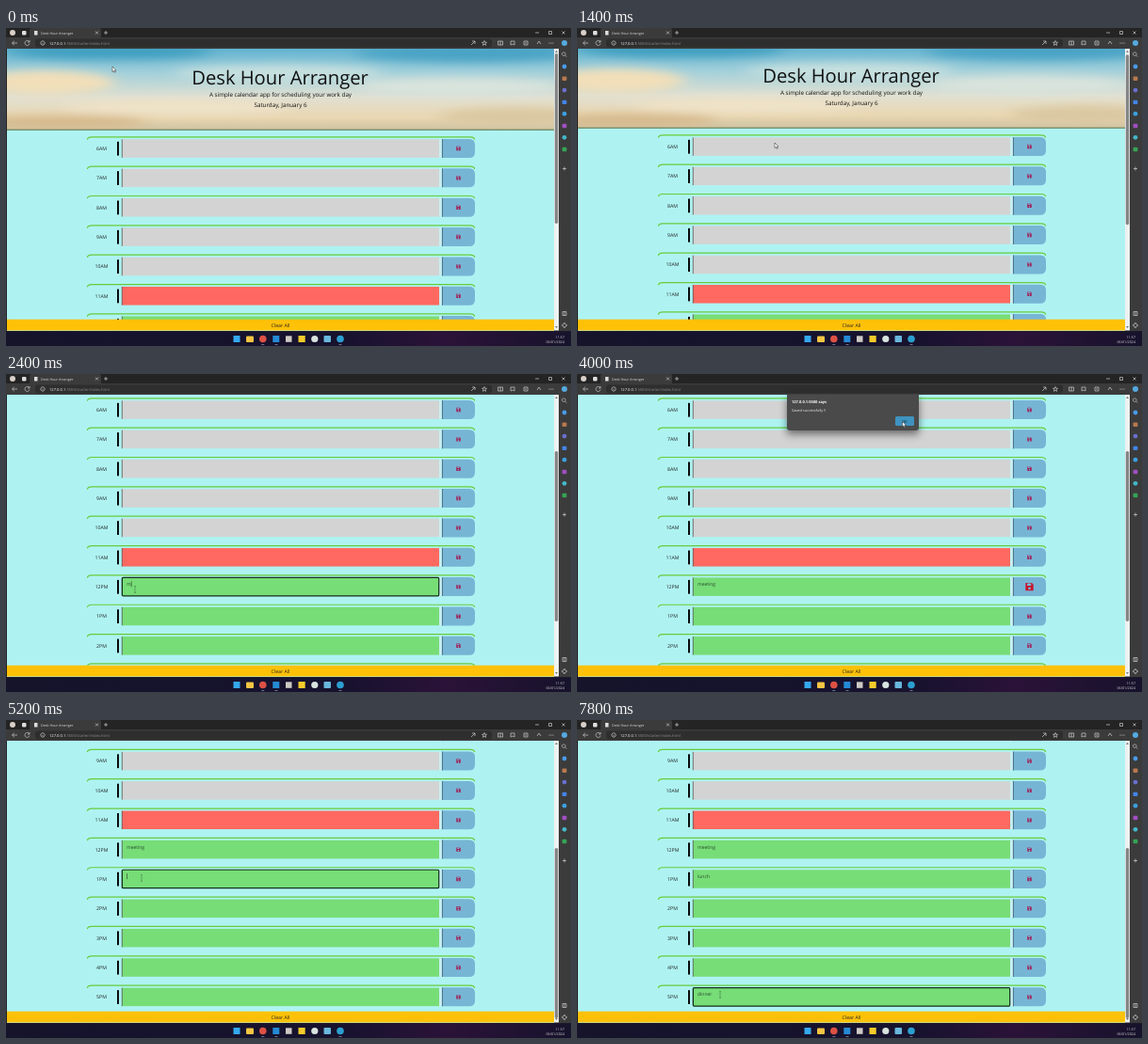
These frames come from a looping animation (600 by 338 pixels, 8000 ms). An HTML page:

```html
<!DOCTYPE html>
<html lang="en">
<head>
<meta charset="utf-8">
<title>Desk Hour Arranger</title>
<style>
  html, body { margin: 0; width: 100%; height: 100%; overflow: hidden; background: #222; }
  svg { display: block; width: 100%; height: 100%; }
  text { font-family: "Open Sans", "Noto Sans", sans-serif; text-rendering: geometricPrecision; white-space: pre; }
  .mid { text-anchor: middle; }
  .line { fill: none; stroke: #ccc; stroke-width: .7; }
</style>
</head>
<body>
<svg viewBox="0 0 600 338" id="stage">
  <defs>
    <linearGradient id="sky" x2="0" y2="1">
      <stop offset="0" stop-color="#62b3d0"/>
      <stop offset=".3" stop-color="#a3d0da"/>
      <stop offset=".6" stop-color="#e0e0d2"/>
      <stop offset=".85" stop-color="#ead7b2"/>
      <stop offset="1" stop-color="#cfc3a2"/>
    </linearGradient>
    <linearGradient id="bar">
      <stop offset="0" stop-color="#15142b"/>
      <stop offset=".6" stop-color="#17122e"/>
      <stop offset=".78" stop-color="#2b1238"/>
      <stop offset="1" stop-color="#17132c"/>
    </linearGradient>
    <filter id="soft" x="-50%" y="-100%" width="200%" height="300%"><feGaussianBlur stdDeviation="9 5"/></filter>
    <filter id="shade" x="-20%" y="-30%" width="140%" height="190%"><feGaussianBlur stdDeviation="4"/></filter>
    <clipPath id="view"><rect x="1" y="22" width="581" height="288"/></clipPath>
    <clipPath id="skyClip"><rect x="1" y="22" width="581" height="86"/></clipPath>
    <path id="disk" d="M-2.2-2.2H1.3L2.2-1.3V2.2H-2.2ZM-1.3-1.9V-.6H.9V-1.9ZM0 .2A.75.75 0 1 0 .01 .2Z" fill-rule="evenodd"/>
  </defs>

  <rect width="600" height="338" fill="#242424"/>
  <g id="chrome"></g>

  <rect x="1" y="22" width="581" height="300" fill="#aef3f2"/>
  <g clip-path="url(#view)">
    <g id="page">
      <g clip-path="url(#skyClip)">
        <rect x="1" y="22" width="581" height="86" fill="url(#sky)"/>
        <g filter="url(#soft)">
          <ellipse cx="110" cy="25" rx="110" ry="8" fill="#3f9fc0"/>
          <ellipse cx="490" cy="27" rx="120" ry="9" fill="#48a3c5"/>
          <ellipse cx="40" cy="58" rx="75" ry="13" fill="#f2dfb9"/>
          <ellipse cx="290" cy="48" rx="110" ry="9" fill="#c7e0df"/>
          <ellipse cx="480" cy="62" rx="110" ry="9" fill="#d9e4dd"/>
          <ellipse cx="180" cy="84" rx="120" ry="7" fill="#f0e3c8"/>
          <ellipse cx="540" cy="94" rx="80" ry="9" fill="#d9c7a0"/>
          <ellipse cx="60" cy="100" rx="90" ry="7" fill="#d6b98d"/>
        </g>
      </g>
      <rect x="1" y="107.7" width="581" height="1" fill="#587044"/>
      <g class="mid" fill="#111">
        <text x="291" y="60" font-size="20.2">Desk Hour Arranger</text>
        <text x="291.5" y="72.8" font-size="6.27">A simple calendar app for scheduling your work day</text>
        <text x="291.5" y="84" font-size="6.27">Saturday, January 6</text>
      </g>
      <g id="rows"></g>
    </g>
  </g>
  <rect x="1" y="309.7" width="581" height="11.8" fill="#ffc107"/>
  <text class="mid" x="291.5" y="317.6" font-size="5.2" fill="#222">Clear All</text>

  <rect x="582" y="22" width="5" height="299.5" fill="#eef1f1"/>
  <path d="M583 26L584.5 24L586 26ZM583 317L584.5 319L586 317Z" fill="#777"/>
  <rect id="thumb" x="582.8" width="3.4" height="181" rx="1.7" fill="#858585"/>

  <g id="dialog">
    <rect x="223" y="26" width="140" height="38" fill="#000" opacity=".5" filter="url(#shade)"/>
    <path d="M223 21.5H363V57Q363 60 360 60H226Q223 60 223 57Z" fill="#4a4a4a"/>
    <text x="228" y="31" font-size="4" font-weight="700" fill="#fff">127.0.0.1:5500 says</text>
    <text x="228" y="39.6" font-size="3.9" fill="#eee">Saved successfully !!</text>
    <rect x="338" y="45" width="20" height="10" rx="1.5" fill="#3f93bf"/>
    <text class="mid" x="348" y="51.6" font-size="4" fill="#123">OK</text>
  </g>

  <path id="arrow" d="M0 0V5.6L1.4 4.4L2.3 6.4L3.2 6L2.3 4.1H4Z" fill="#fff" stroke="#222" stroke-width=".5"/>
  <path id="beam" d="M-1-3.4H1M0-3.4V3.4M-1 3.4H1" fill="none" stroke="#3c6b42" stroke-width=".5"/>
</svg>

<script>
const LOOP = 8000, STEP = 200, PITCH = 31.35;
const $ = id => document.getElementById(id);

function add(parent, tag, attrs, content = '') {
  const el = document.createElementNS('http://www.w3.org/2000/svg', tag);
  for (const key in attrs) el.setAttribute(key, attrs[key]);
  el.textContent = content;
  parent.append(el);
  return el;
}

// Browser window and taskbar
const chrome = $('chrome');
const box = (x, y, width, height, fill, rx = 0) => add(chrome, 'rect', { x, y, width, height, fill, rx });
const dot = (cx, cy, r, fill) => add(chrome, 'circle', { cx, cy, r, fill });
const line = d => add(chrome, 'path', { d, class: 'line' });
const label = (x, y, size, fill, content, anchor = 'start') =>
  add(chrome, 'text', { x, y, 'font-size': size, fill, 'text-anchor': anchor }, content);

box(25, 0, 76, 12, '#3b3b3b', 2);
box(0, 10, 600, 12, '#3b3b3b');
box(587, 10, 13, 312, '#3b3b3b');
box(31, 11.5, 485, 9, '#2e2e2e', 3);
dot(7, 5, 3, '#d8cfc9');
box(17, 3, 4.5, 4.5, '#ddd', 1);
box(30, 3, 3.5, 4.5, '#ddd');
label(37, 6.6, 3.7, '#ddd', 'Desk Hour Arranger');
line('M95 3.5L98 6.5M98 3.5L95 6.5M104 5H108M106 3V7');
line('M562 5H566M576.5 3.5H579.5V6.5H576.5ZM590.5 3.5L593.5 6.5M593.5 3.5L590.5 6.5');
line('M12 16H6.5L8.8 13.8M6.5 16L8.8 18.2M24.6 14.5A2.5 2.5 0 1 0 25 16.5M25 13V15H23');
line('M39 13.8A2.2 2.2 0 1 0 39.01 13.8M39 15.8V17.2');
label(46, 17.6, 4.1, '#fff', '127.0.0.1').insertAdjacentHTML('beforeend',
  '<tspan fill="#8b8b8b">:5500/starter/index.html</tspan>');
line('M494 18L498 14M495 14H498V17M508 13.5L508.7 15.3H510.5L509 16.5L509.6 18.4L508 17.3L506.4 18.4L507 16.5L505.5 15.3H507.3Z');
line('M522.5 14H527.5V18H522.5ZM525 14V18M536 14H540V18L538 17L536 18ZM550 14H554V18H550ZM552 15V17M564 17L566 14L568 17');
[577, 579, 581].forEach(x => dot(x, 16, .55, '#ccc'));

dot(593, 16, 3, '#55a9df');
line('M592.3 25.8A1.8 1.8 0 1 0 592.31 25.8M593.7 29L595.2 30.6');
['#4a9bea', '#b8794f', '#6a6fd0', '#4385e8', '#3aa0e0', '#a04fc0', '#42b8c8', '#35a455']
  .forEach((fill, i) => i % 2 ? box(590.6, 39 + 12.55 * i, 4.8, 4.4, fill, 1) : dot(593, 41 + 12.55 * i, 2.4, fill));
line('M591 149.5H595M593 147.5V151.5M591 301.5H595V305.5H591ZM593 301.5V305.5');
line('M593 314A2 2 0 1 0 593.01 314M593 313V314M593 318V319M590 316H591M595 316H596');

box(0, 322.3, 600, 15.7, 'url(#bar)');
box(241.5, 327, 7, 7, '#35a8ee');
box(255, 327.5, 8, 6.5, '#f5c543', 1);
dot(272.8, 330.5, 3.8, '#dd5144');
box(283.3, 327, 7, 7, '#2589d5');
box(297, 327.3, 6.5, 6.5, '#cfcac4');
box(310.5, 327, 7.2, 7, '#f4cb2a');
dot(327.8, 330.5, 3.6, '#d9e3df');
box(337.5, 327, 7.5, 7, '#69b7dc', 1);
dot(355, 330.5, 3.8, '#2b9fd0');
[272.8, 287, 355].forEach(x => box(x - 1.5, 336, 3, .7, '#8fa0b0'));
label(593, 329.7, 3.7, '#ddd', '11:57', 'end');
label(593, 335.2, 3.7, '#ddd', '06/01/2024', 'end');

// Planner rows
const rows = Array.from({ length: 12 }, (_, i) => {
  const hour = i + 6;
  const g = add($('rows'), 'g', { transform: `translate(0 ${128 + i * PITCH})` });
  const name = (hour > 12 ? hour - 12 : hour) + (hour < 12 ? 'AM' : 'PM');
  const fill = hour < 11 ? '#d3d3d3' : hour === 11 ? '#ff6961' : '#77dd77';
  add(g, 'path', { d: 'M86.3-9.5Q87-12.2 91-12.2H493Q497-12.2 497.7-9.5', fill: 'none', stroke: '#68cb3c', 'stroke-width': 1.2 });
  add(g, 'text', { class: 'mid', x: 101.5, y: 1.9, 'font-size': 5.2, fill: '#222' }, name);
  add(g, 'rect', { x: 118, y: -7.2, width: 1.9, height: 14.8, fill: '#000' });
  add(g, 'rect', { x: 123, y: -9.7, width: 337, height: 19.5, fill });
  add(g, 'rect', { x: 122.8, y: -9.7, width: .8, height: 19.5, fill: '#555' });
  add(g, 'rect', { x: 460, y: -9.7, width: 3, height: 19.5, fill: '#c9f0f3' });
  add(g, 'path', { d: 'M463-10H492Q498-10 498-4V4Q498 10 492 10H463Z', fill: '#77b5d5' });
  add(g, 'rect', { x: 462.9, y: -10, width: .8, height: 20, fill: '#3c5f70' });
  return {
    ring: add(g, 'rect', { x: 123.4, y: -9.7, width: 336.3, height: 19.4, rx: 1, fill: 'none', stroke: '#14301a', 'stroke-width': 1.2 }),
    text: add(g, 'text', { x: 128, y: -.9, 'font-size': 5, fill: '#24482a' }),
    caret: add(g, 'rect', { y: -5.8, width: .5, height: 6, fill: '#111' }),
    icon: add(g, 'use', { href: '#disk' })
  };
});

// Timeline: each key is [time, ...values], joined by straight lines
const scrollKeys = [[0, 0], [400, 0], [800, 86], [1000, 130], [1400, 2], [1600, 0], [1800, 30], [2000, 90], [4400, 90], [4800, 178.5]];
const pointerKeys = [[0, 113, 41], [400, 190, 85], [800, 211, 101], [1400, 210, 122], [1800, 190, 170], [2200, 137, 229],
  [3000, 137, 229], [3400, 479, 225], [3600, 479, 225], [4000, 345.5, 50.5], [4200, 345.5, 50.5], [5000, 144, 168], [5800, 144, 168],
  [6200, 479, 167], [6400, 479, 167], [6600, 345.5, 50.5], [6800, 345.5, 50.5], [7200, 152, 292]];
const entries = [
  { row: 6, word: 'meeting', focus: 2200, type: 2400, save: 3400, close: 4200 },
  { row: 7, word: 'lunch', focus: 5200, type: 5400, save: 6200, close: 6800 },
  { row: 11, word: 'dinner', focus: 7200, type: 7300, save: LOOP, close: LOOP }
];

function sample(keys, t) {
  const i = keys.findIndex(k => k[0] > t);
  if (i < 0) return keys.at(-1).slice(1);
  const a = keys[i - 1], b = keys[i], p = (t - a[0]) / (b[0] - a[0]);
  return a.slice(1).map((v, n) => v + (b[n + 1] - v) * p);
}
const show = (el, on) => el.setAttribute('visibility', on ? 'visible' : 'hidden');
const move = (el, x, y, scale = 1) => el.setAttribute('transform', `translate(${x} ${y}) scale(${scale})`);

function draw(t) {
  const [scroll] = sample(scrollKeys, t);
  const [x, y] = sample(pointerKeys, t);
  move($('page'), 0, -scroll);
  $('thumb').setAttribute('y', 27 + scroll * .61);

  rows.forEach((row, i) => {
    const e = entries.find(e => e.row === i);
    const focused = !!e && t >= e.focus && t < e.save;
    const hover = !!e && t >= e.save && t < e.close;
    const count = e && t >= e.type ? Math.floor((t - e.type) / 100) + 1 : 0;
    row.text.textContent = e ? e.word.slice(0, count) : '';
    show(row.ring, focused);
    show(row.caret, focused && i !== 11);
    if (focused) row.caret.setAttribute('x', 128.2 + (count ? row.text.getComputedTextLength() : 0));
    move(row.icon, 480.5, 0, hover ? 1.9 : 1);
    row.icon.setAttribute('fill', hover ? '#c5162e' : '#a3174f');
  });

  const dialog = entries.some(e => t >= e.save + 200 && t < e.close);
  show($('dialog'), dialog);
  const inField = entries.some(e => t >= e.focus && t < e.save) && x < 460;
  show($('beam'), inField);
  show($('arrow'), !inField);
  move($('beam'), x, y);
  move($('arrow'), x, y);
}

function tick() {
  const t = performance.now() % LOOP;
  draw(Math.floor(t / STEP) * STEP);
  requestAnimationFrame(tick);
}
tick();
</script>
</body>
</html>
```
